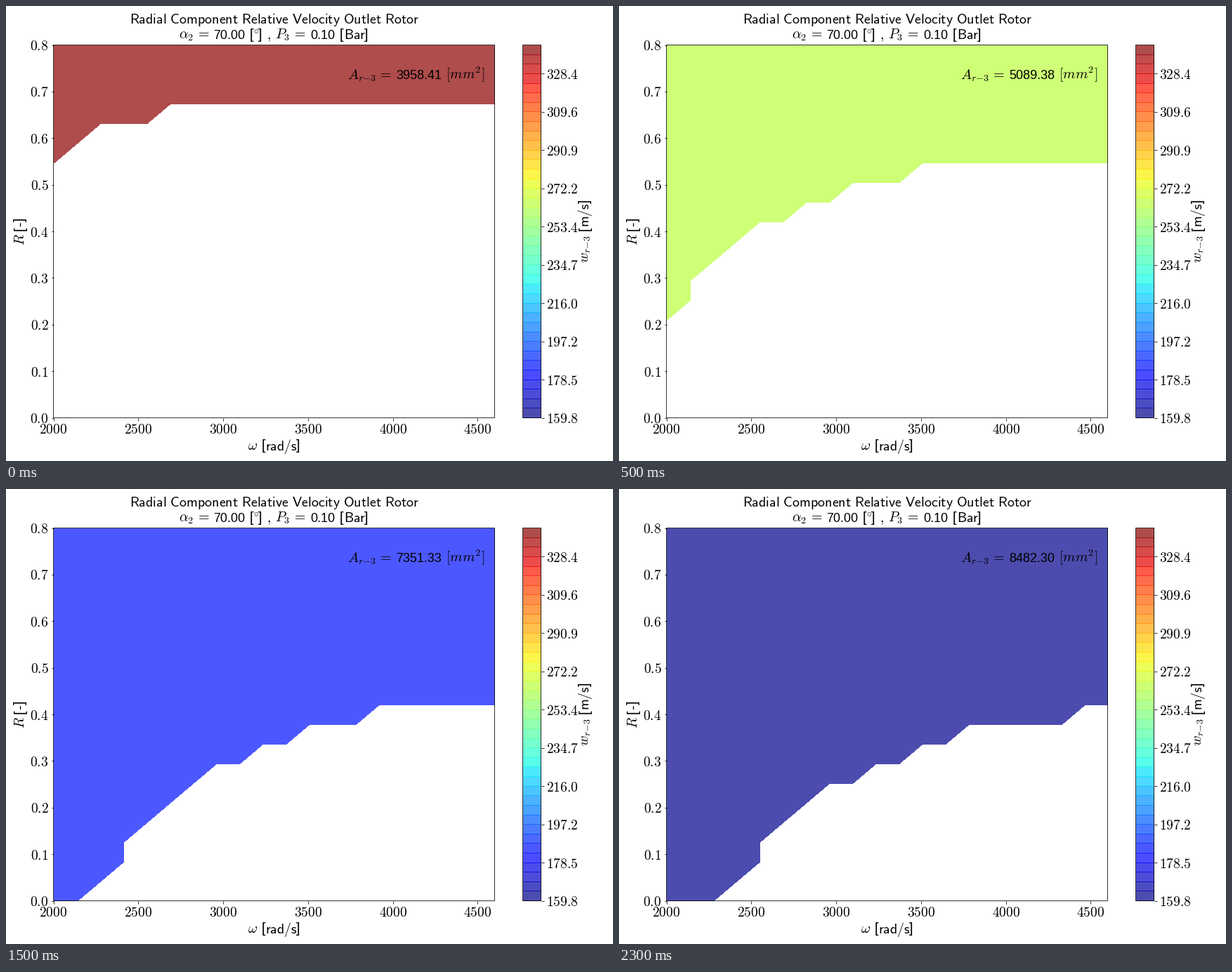
Write a matplotlib script that moves like this. It is 864 px wide and 648 px high and loops after 2.5 s.

```python
import numpy as np
import matplotlib.pyplot as plt
from matplotlib.animation import FuncAnimation
from matplotlib.patches import Polygon, Rectangle
from matplotlib.transforms import Affine2D

W, H = 864, 648
SIZE, TICK_SIZE = 20, 19.5
LEFT, RIGHT, TOP, BOTTOM = 67.6, 695.6, 55.6, 586.6
ALPHA = 0.7
BANDS = 39
GRID = 19  # cells along each axis

plt.rcParams.update({"mathtext.fontset": "cm", "figure.dpi": 72,
                     "savefig.dpi": 72})

# Radial velocity is inversely proportional to the outlet area
areas = np.linspace(3958.41, 8482.30, 5)
speeds = 159.787 * areas[-1] / areas
levels = np.linspace(speeds[-1], speeds[0], BANDS + 1)

# Lowest valid reaction, base + rise * tanh(column / width), in grid cells
LIMITS = [(12.9, 3, 4.9), (4.85, 7.9, 6.83), (0.45, 10.6, 8.3),
          (-2.1, 12, 8.48), (-3.6, 13.06, 8.85)]


def valid_region(base, rise, width):
    """Outline of the grid points above the limit, with cut corners."""
    cols = np.arange(GRID + 1)
    low = np.ceil(base + rise * np.tanh(cols / width)).clip(0)
    points = [(0, GRID)]
    for i in cols[:-1]:
        points += [(i, low[i]), (i, max(low[i], low[i + 1] - 1))]
    points += [(GRID, low[-1]), (GRID, GRID)]
    return np.array(points) / GRID * (2600, 0.8) + (2000, 0)


def band_color(k):
    return plt.cm.jet((k + 0.5) / BANDS, alpha=ALPHA)


def add_axes(x0, x1):
    """Axes between two pixel columns, with a crisp one pixel frame."""
    axes = fig.add_axes([x0 / W, 1 - BOTTOM / H,
                         (x1 - x0) / W, (BOTTOM - TOP) / H])
    axes.spines[:].set_visible(False)
    left, top, right, bottom = np.floor([x0, TOP, x1, BOTTOM]) + 0.5
    axes.add_patch(Rectangle((left, H - bottom), right - left, bottom - top,
                             fill=False, lw=0.8, snap=False, zorder=3,
                             transform=None, clip_on=False))
    return axes


def label(x, y, text, **kw):
    if not text.startswith("$"):
        kw = {"family": "Liberation Sans",
              "fontsize": 18 if text[:1].isdigit() else SIZE, **kw}
    kw = {"ha": "left", "va": "baseline", "fontsize": SIZE,
          "rotation_mode": "anchor", **kw}
    return fig.text(x / W, 1 - y / H, text, **kw)


def row(x, y, *parts, upright=False):
    """Set (offset, text) parts on one baseline, level or turned upwards."""
    for d, text in parts:
        if upright:
            label(x, y - d, text, rotation=90)
        else:
            label(x + d, y, text)


fig = plt.figure(figsize=(W / 72, H / 72), facecolor="white")

ax = add_axes(LEFT, RIGHT)
ax.set(xlim=(2000, 4600), ylim=(0, 0.8))
xticks = np.arange(2000, 4501, 500)
yticks = np.arange(9) / 10
ax.set_xticks(xticks, [f"${v}$" for v in xticks])
ax.set_yticks(yticks, [f"${v:.1f}$" for v in yticks])
ax.tick_params(labelsize=TICK_SIZE)

cax = add_axes(735.6, 761.6)
cax.set(xlim=(0, 1), ylim=(levels[0], levels[-1]), xticks=[])
cax.yaxis.tick_right()
cax.set_yticks(levels[::4], [f"${v:.1f}$" for v in levels[::4]])
cax.tick_params(labelsize=TICK_SIZE)
half_up = cax.get_yaxis_transform() + Affine2D().translate(0, 0.5)
for k in range(BANDS):
    cax.axhspan(levels[k], levels[k + 1], color=band_color(k), lw=0)
    if k:
        # neighbouring translucent bands overlap by one pixel
        cax.plot([0, 1], [levels[k]] * 2, color=band_color(k), lw=1,
                 solid_capstyle="butt", transform=half_up)
cax.set_ylim(levels[0], levels[-1])

title = "Radial Component Relative Velocity Outlet Rotor"
label((LEFT + RIGHT) / 2, 25.4, r"$\mathsf{%s}$" % title.replace(" ", r"\ "),
      ha="center")
row(246, 46.6, (0, r"$\alpha_2\,=$"), (49, "70.00"),
    (100.4, "["), (106, r"${}^{\circ}$"), (113, "]"), (125, "$,$"),
    (137, r"$P_3\,=$"), (187, "0.10"),
    (229, "["), (234.7, r"$\mathsf{Bar}$"), (264, "]"))
row(344.2, 632.5, (0, r"$\omega$"),
    (19, "["), (24.8, r"$\mathsf{rad/s}$"), (69.1, "]"))
row(26, 341.5, (0, "$R$"), (21.8, "["), (27.6, "-"), (34.2, "]"),
    upright=True)
row(830, 366.5, (0, r"$w_{r{-}3}$"),
    (46, "["), (51.8, r"$\mathsf{m/s}$"), (85.2, "]"), upright=True)
row(486.3, 104.5, (0, r"$A_{r{-}3}\,=$"), (140, "$[mm^2]$"))
area_text = label(555, 104.5, "0")

region = ax.add_patch(Polygon(
    valid_region(*LIMITS[0]), lw=0, antialiased=False,
    transform=ax.transData + Affine2D().translate(0.5, -0.5)))


def update(i):
    region.set_xy(valid_region(*LIMITS[i]))
    k = int((speeds[i] - levels[0]) / (levels[1] - levels[0]))
    region.set_facecolor(band_color(min(k, BANDS - 1)))
    area_text.set_text(f"{areas[i]:.2f}")
    return region, area_text


anim = FuncAnimation(fig, update, frames=5, interval=500, repeat=True,
                     repeat_delay=0, blit=False)
plt.show()
```
